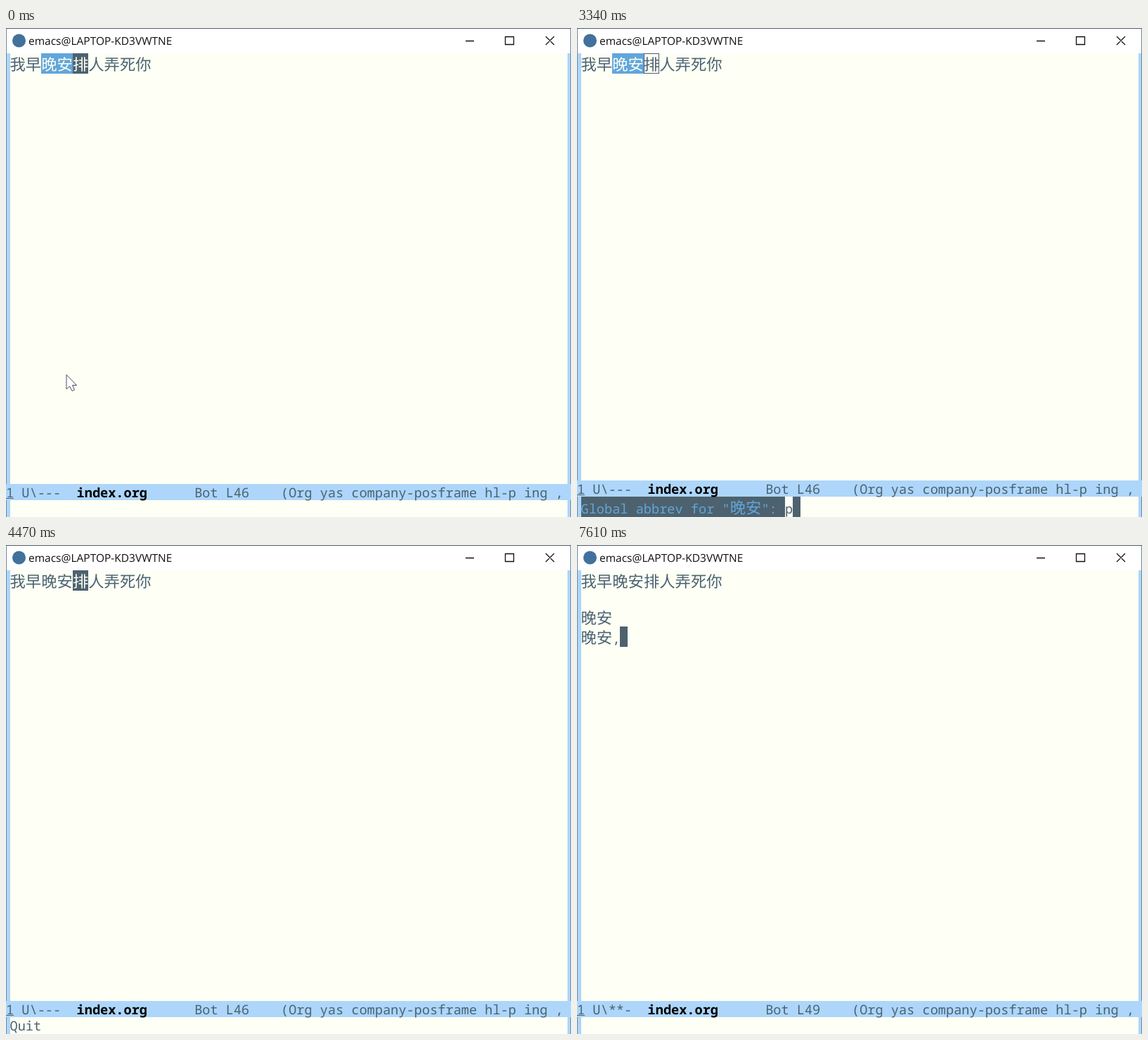
Recreate the animation shown at these times as an HTML page. Size 804 by 696 pixels, loop 8600 ms.

```html
<!DOCTYPE html>
<html lang="zh-CN">
<head>
<meta charset="utf-8">
<title>Editor abbrev demo</title>
<style>
  html, body { margin: 0; width: 100%; height: 100%; overflow: hidden; background: #fefff5; }
  svg { display: block; width: 804px; height: 696px; }
  text { white-space: pre; text-rendering: geometricPrecision; }
  .mono { font: 18.62px "Noto Sans Mono", "DejaVu Sans Mono", monospace; }
  .cjk { font: 22.35px "Noto Sans CJK SC", "Noto Sans CJK", sans-serif; }
  .title { font: 15.5px "Open Sans", "Noto Sans", sans-serif; }
  .bold { font-weight: 700; }
</style>
</head>
<body>
<svg viewBox="0 0 804 696">
  <rect width="804" height="696" fill="#fefff5"/>
  <rect width="804" height="36" fill="#fff"/>
  <g fill="#add6fa">
    <rect y="36" width="6" height="660"/>
    <rect x="799" y="36" width="5" height="660"/>
  </g>
  <rect width="804" height="1" fill="#4c5a66"/>
  <g fill="#74889a">
    <rect y="1" width="1" height="695"/>
    <rect x="803" y="1" width="1" height="695"/>
  </g>
  <circle cx="18.5" cy="18" r="9.5" fill="#41719c"/>
  <text class="title" x="32" y="23.5" fill="#111">emacs@LAPTOP-KD3VWTNE</text>
  <path d="M654 18.5H666M710.5 12.5H722.5V23.5H710.5ZM768 12L780 24M780 12L768 24" fill="none" stroke="#111" stroke-width="1.3"/>
  <g id="buffer"></g>
  <g id="echo"></g>
  <g id="mode"></g>
  <path id="pointer" d="M86 493.5V514L90.5 510L94 516.5L97.5 515L94.5 508.5H100.5Z" fill="#fff" stroke="#4a4f60" stroke-width="1"/>
</svg>
<script>
const LOOP = 8600, COL = 11.172, LEFT = 5.5;
const INK = "#4a6272", BLOCK = "#4d626e", SELECT = "#61a6db", PAPER = "#fefff5", BAR = "#add6fa";
const PROMPT = 'Global abbrev for "晚安": ';
const $ = id => document.getElementById(id);

// Each step changes only the listed parts of the state.
const start = { echo: "", prompt: "", input: "", selected: true, cursor: "han", flag: "---",
  line: 46, third: "", fourth: "", barY: 649, pointer: true, miniCursor: -1 };
const steps = [
  [0, {}],
  [1060, { echo: "C-u 0-" }],
  [1390, { echo: "C-u 0 C-x-" }],
  [1800, { echo: "C-u 0 C-x a-" }],
  [2000, { echo: "", prompt: PROMPT, cursor: "hollow", barY: 644, miniCursor: 26 }],
  [3340, { input: "p", miniCursor: 27, pointer: false }],
  [3600, { prompt: PROMPT.replace("G", " "), cursor: "han", barY: 649, miniCursor: -1 }],
  [3660, { prompt: "", input: "" }],
  [4470, { selected: false, echo: "Quit" }],
  [4740, { echo: "", cursor: [0, 64, 24], flag: "**-", line: 47 }],
  [5140, { cursor: [0, 88, 24], line: 48 }],
  [5400, { third: "p", cursor: [1, 88, 24] }],
  [6400, { third: "晚安", cursor: [0, 116, 24], line: 49 }],
  [7330, { fourth: "p", cursor: [1, 116, 24] }],
  [7610, { fourth: "晚安,", cursor: [5, 116, 29] }]
];

let state = start;
const states = steps.map(([, change]) => state = { ...state, ...change });

const isHan = s => /[\u4e00-\u9fff]/.test(s);
const atCol = c => LEFT + c * COL;
const box = (x, y, w, h, fill) => `<rect x="${x}" y="${y}" width="${w}" height="${h}" fill="${fill}"/>`;
const label = (x, y, s, fill, cls) =>
  `<text class="${cls}" x="${x}" y="${y}" fill="${fill}">${s}</text>`;

// Lays out Latin runs in one column per letter and Han runs in two.
function write(s, y, fill, col = 0) {
  let out = "";
  for (const run of s.match(/[\u4e00-\u9fff]+|[^\u4e00-\u9fff]+/g) || []) {
    const han = isHan(run);
    out += label(atCol(col), y, run, fill, han ? "cjk" : "mono");
    col += run.length * (han ? 2 : 1);
  }
  return out;
}

function drawBuffer(s) {
  const solid = s.cursor === "han";
  let out = "";
  if (s.selected) out += box(50, 36, 45, 29, SELECT);
  if (solid) out += box(95, 36, 22, 29, BLOCK);
  if (s.cursor === "hollow")
    out += `<rect x="95.5" y="36.5" width="21" height="28" fill="none" stroke="${BLOCK}"/>`;
  if (Array.isArray(s.cursor)) {
    const [col, y, h] = s.cursor;
    out += box(Math.round(atCol(col)), y, 11, h, BLOCK);
  }
  out += write("我早", 59.5, INK);
  out += write("晚安", 59.5, s.selected ? PAPER : INK, 4);
  out += write("排", 59.5, solid ? PAPER : INK, 8);
  out += write("人弄死你", 59.5, INK, 10);
  out += write(s.third, isHan(s.third) ? 112 : 107, INK);
  out += write(s.fourth, isHan(s.fourth) ? 140 : 135, INK);
  return out;
}

function drawEcho(s) {
  const top = s.barY + 23;
  let out = "";
  if (s.prompt) out += box(6, top, 290, 696 - top, BLOCK);
  if (s.miniCursor >= 0) out += box(Math.round(atCol(s.miniCursor)), top, 11, 696 - top, BLOCK);
  return out + write(s.prompt, 691, SELECT) + write(s.input, 691, INK, 26) + write(s.echo, 691, INK);
}

function drawMode(s) {
  const y = s.barY + 18.5;
  const put = (col, t, fill = INK, cls = "mono") => label(col * COL, y, t, fill, cls);
  return box(0, s.barY, 804, 23, BAR) + put(0, "1") + box(0, s.barY + 20, 11, 1, INK) +
    put(2, "U\\" + s.flag) + put(9, "index.org", "#000", "mono bold") +
    put(24, "Bot L" + s.line) + put(35, "(Org yas company-posframe hl-p ing ,");
}

let shown = -1;
function tick() {
  const t = performance.now() % LOOP;
  const now = steps.filter(([at]) => at <= t).length - 1;
  if (now !== shown) {
    shown = now;
    const s = states[now];
    $("buffer").innerHTML = drawBuffer(s);
    $("echo").innerHTML = drawEcho(s);
    $("mode").innerHTML = drawMode(s);
    $("pointer").style.display = s.pointer ? "" : "none";
  }
  requestAnimationFrame(tick);
}
tick();
</script>
</body>
</html>
```
